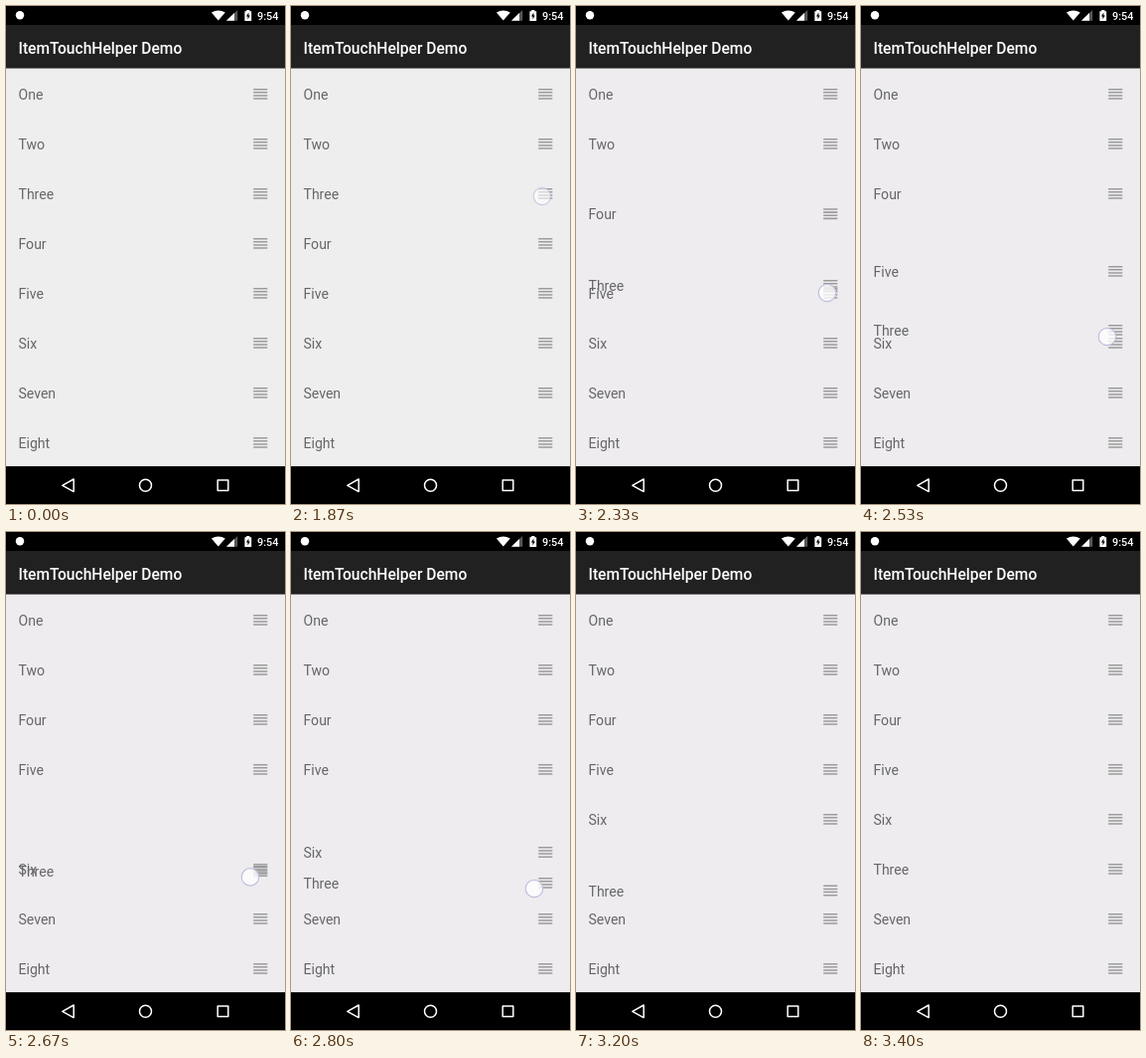
These frames come from a looping animation (281 px wide and 500 px high, 3.79 s). An HTML page:

```html
<!DOCTYPE html>
<html lang="en">
<head>
<meta charset="utf-8">
<title>Drag to reorder</title>
<style>
  html, body { margin: 0; width: 100%; height: 100%; overflow: hidden; background: #000; }
  svg { display: block; width: 100vw; height: 100vh; }
  text { font-family: Roboto, sans-serif; }
  .row text { font-size: 14.05px; fill: #666; }
  .row path { fill: #9b9b9b; }
  .title { font-size: 15.6px; font-weight: 500; fill: #fff; }
  .clock { font-size: 10.9px; font-weight: 500; fill: #fff; }
  .nav { fill: none; stroke: #fff; stroke-width: 1.5; stroke-linejoin: round; }
</style>
</head>
<body>
<svg viewBox="0 0 281 500">
  <rect width="281" height="500" fill="#000"/>
  <rect y="19" width="281" height="44" fill="#212121"/>
  <rect id="list" y="62.6" width="281" height="399.5" fill="#eee"/>

  <g fill="#fff">
    <circle cx="14" cy="9.3" r="4.2"/>
    <path d="M213.8 14.6 206.9 6.6Q213.8 2.6 220.8 6.6Z"/>
    <path d="M222 14.8 233.2 4V14.8Z" opacity=".35"/>
    <path d="M222 14.8 230 7.1V14.8Z"/>
    <path d="M240.4 5.2H242.2V4H245.4V5.2H247.2V14.9H240.4Z"/>
  </g>
  <path d="M244.4 6.6 241.9 10.5H243.5V13.5L245.8 9.5H244.4Z" fill="#000"/>
  <text class="clock" x="253" y="13.7">9:54</text>
  <text class="title" x="12.5" y="47.6">ItemTouchHelper Demo</text>

  <g id="rows"></g>
  <circle id="touch" r="8.7" fill="#fff" fill-opacity=".78" stroke="#c3bede" stroke-width="1.2"/>

  <g class="nav">
    <path d="M56.8 481.3 68.2 475V487.6Z"/>
    <circle cx="140.5" cy="481.2" r="6"/>
    <rect x="213.2" y="476" width="10.6" height="10.6"/>
  </g>
</svg>
<script>
const LOOP = 3790, ROW = 50, TOP = 89, MOVE = 3.75;
const $ = id => document.getElementById(id);
const list = $('list'), touch = $('touch');

// Positions are keyed in ticks of 1/15 s.
const dragY = [[28, 189], [32, 227], [35, 281], [38, 326], [42, 353], [43, 358.5], [45, 366]];
const touchY = [[28, 191], [32, 235], [35, 288], [38, 332], [42, 358], [43, 364], [45, 369]];
const touchX = [[28, 253], [32, 259], [35, 253], [38, 248], [42, 245], [45, 245]];
const swapAt = { Four: 32.9, Five: 36.27, Six: 40.52 };
const DROP = 46.9, RELEASE = 47;

const bars = [0, 1, 2, 3].map(i => `M249.2 ${-6.1 + i * 3.12}h14.1v1.56h-14.1z`).join('');
const names = ['One', 'Two', 'Three', 'Four', 'Five', 'Six', 'Seven', 'Eight'];
$('rows').innerHTML = names.map(n =>
  `<g class="row"><text x="12.5" y="5">${n}</text><path d="${bars}"/></g>`).join('');
const rows = [...$('rows').children];

const ease = p => 0.5 - 0.5 * Math.cos(Math.PI * Math.min(1, Math.max(0, p)));

// Monotone cubic through the keys, at rest at both ends.
function curve(keys, k) {
  const last = keys.length - 1;
  if (k <= keys[0][0]) return keys[0][1];
  if (k >= keys[last][0]) return keys[last][1];
  const rise = i => (keys[i + 1][1] - keys[i][1]) / (keys[i + 1][0] - keys[i][0]);
  const slope = i => {
    if (i === 0 || i === last) return 0;
    const a = rise(i - 1), b = rise(i);
    return a * b > 0 ? 2 * a * b / (a + b) : 0;
  };
  const i = keys.findIndex(key => key[0] > k) - 1;
  const [x0, y0] = keys[i], [x1, y1] = keys[i + 1];
  const h = x1 - x0, u = (k - x0) / h, v = 1 - u;
  return v * v * (1 + 2 * u) * y0 + u * u * (3 - 2 * u) * y1
    + h * u * v * (v * slope(i) - u * slope(i + 1));
}

// Ticks start on whole hundredths of a second.
function tick(t) {
  const k = Math.floor(t * 0.015 + 0.06);
  return Math.round(k * 20 / 3) * 10 > t ? k - 1 : k;
}

function rowY(name, i, k) {
  const home = TOP + i * ROW;
  if (name === 'Three') {
    const y = curve(dragY, k);
    return y + (TOP + 5 * ROW - y) * ease((k - DROP) / MOVE);
  }
  return name in swapAt ? home - ROW * ease((k - swapAt[name]) / MOVE) : home;
}

function draw(now) {
  const k = tick(now % LOOP);
  names.forEach((n, i) => rows[i].setAttribute('transform', `translate(0 ${rowY(n, i, k).toFixed(2)})`));
  touch.setAttribute('cx', curve(touchX, k));
  touch.setAttribute('cy', curve(touchY, k));
  touch.setAttribute('opacity', k < 28 || k >= RELEASE ? 0 : k === 28 ? 0.75 : 1);
  list.setAttribute('fill', k > 28 ? '#eeecef' : '#eee');
}

let start;
function loop(now) {
  start ??= now;
  draw(now - start);
  requestAnimationFrame(loop);
}
draw(0);
requestAnimationFrame(loop);
</script>
</body>
</html>
```
